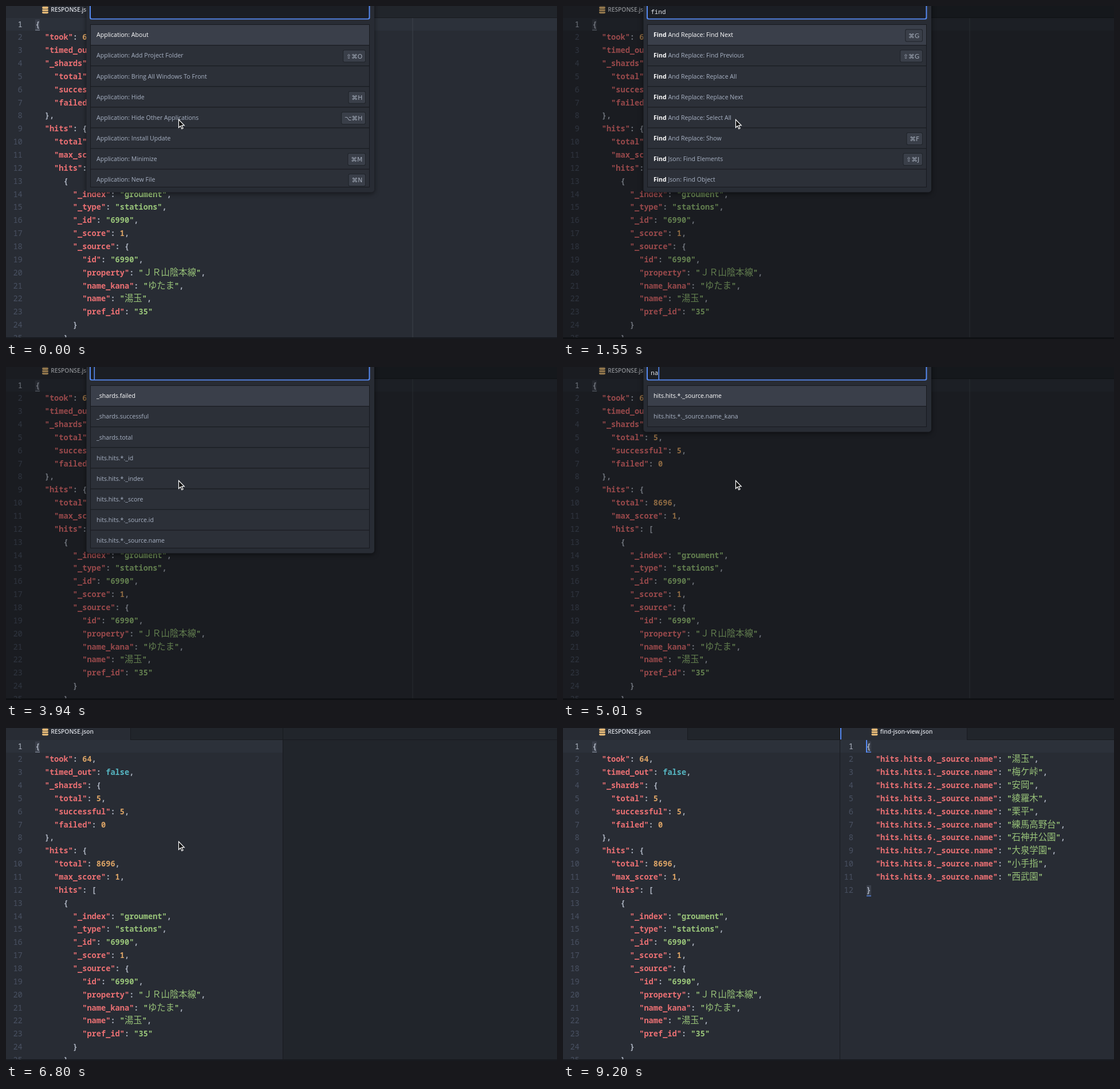
Animation, 962 px wide and 582 px high, one loop 9.5 s. Source, as an HTML page with a canvas:

```html
<!DOCTYPE html>
<html lang="en">
<head>
<meta charset="utf-8">
<title>Find JSON</title>
<style>
html, body { margin: 0; width: 100%; height: 100%; overflow: hidden; background: #282c34; }
canvas { display: block; }
</style>
</head>
<body>
<canvas id="stage" width="962" height="582"></canvas>
<script>
const ctx = document.getElementById('stage').getContext('2d');
const LOOP = 9500, W = 962, H = 582, ROW = 22.85, FOOT = 579;
const UI = '"Open Sans", "Noto Sans", sans-serif';
const MONO = '"Noto Sans Mono", "DejaVu Sans Mono", monospace';
const CJK = '"Noto Sans CJK JP", "Noto Sans CJK", sans-serif';
const C = {
  bg: '#282c34', bar: '#21252b', edge: '#181a1f', line: '#2c313a', blue: '#568af2',
  text: '#abb2bf', gutter: '#495162', key: '#ea7073', str: '#98c379', num: '#d9a265', lit: '#56b6c2'
};

const response = `{
  "took": 64,
  "timed_out": false,
  "_shards": {
    "total": 5,
    "successful": 5,
    "failed": 0
  },
  "hits": {
    "total": 8696,
    "max_score": 1,
    "hits": [
      {
        "_index": "groument",
        "_type": "stations",
        "_id": "6990",
        "_score": 1,
        "_source": {
          "id": "6990",
          "property": "ＪＲ山陰本線",
          "name_kana": "ゆたま",
          "name": "湯玉",
          "pref_id": "35"
        }
      },`.split('\n');

const stations = '湯玉 梅ケ峠 安岡 綾羅木 栗平 練馬高野台 石神井公園 大泉学園 小手指 西武園'.split(' ');
const found = ['{', ...stations.map((s, i) =>
  `  "hits.hits.${i}._source.name": "${s}"${i < 9 ? ',' : ''}`), '}'];

// A "|" separates a command from its key binding.
const lists = {
  app: ['About', 'Add Project Folder|⇧⌘O', 'Bring All Windows To Front', 'Hide|⌘H',
    'Hide Other Applications|⌥⌘H', 'Install Update', 'Minimize|⌘M', 'New File|⌘N'].map(s => 'Application: ' + s),
  find: ['Find And Replace: Find Next|⌘G', 'Find And Replace: Find Previous|⇧⌘G', 'Find And Replace: Replace All',
    'Find And Replace: Replace Next', 'Find And Replace: Select All', 'Find And Replace: Show|⌘F',
    'Find Json: Find Elements|⇧⌘J', 'Find Json: Find Object'],
  json: ['Find Json: Find Object', 'Find Json: Find Elements|⇧⌘J'],
  paths: ['_shards.failed', '_shards.successful', '_shards.total',
    ...['_id', '_index', '_score', '_source.id', '_source.name'].map(s => 'hits.hits.*.' + s)],
  names: ['hits.hits.*._source.name', 'hits.hits.*._source.name_kana']
};

// Palette states: start time, query, list, caret shown, selected row.
const states = [
  [0, '', 'app', 0], [480, '', 'app', 1], [630, 'f', 'find', 1], [780, 'fi', 'find', 1],
  [930, 'fin', 'find', 1], [1110, 'find', 'find', 1], [1550, 'find', 'find', 0],
  [1700, 'find ', 'find', 1], [2000, 'find j', 'find', 1], [2150, 'find js', 'json', 1],
  [2300, 'find jso', 'json', 1], [2450, 'find json', 'json', 0], [2600, 'find json', 'json', 1],
  [3050, 'find json', 'json', 0], [3200, 'find json', 'json', 0, 1], [3350, 'find json', 'json', 1, 1],
  [3790, '', ''], [3940, '', 'paths', 1], [4090, '', 'paths', 0], [4230, '', 'paths', 1],
  [4710, 'n', 'paths', 1], [4860, 'n', 'names', 1], [5010, 'na', 'names', 1], [5160, 'name', 'names', 1],
  [5760, 'name', 'names', 0], [6060, 'name', 'names', 1], [6510, 'name', 'names', 0], [6800, '', '']
];

function rect(x, y, w, h, color) {
  ctx.fillStyle = color;
  ctx.fillRect(x, y, w, h);
}

function text(s, x, y, font, color) {
  ctx.font = font;
  ctx.fillStyle = color;
  ctx.fillText(s, x, y);
  return x + ctx.measureText(s).width;
}

function round(x, y, w, h, r, color) {
  ctx.fillStyle = color;
  ctx.beginPath();
  ctx.roundRect(x, y, w, h, r);
  ctx.fill();
}

function codeLine(s, x, y) {
  const tokens = /("[^"]*")(?=:)|("[^"]*")|(\d+)|(false)|[^"\df]+/g;
  for (const [tok, key, str, num, lit] of s.matchAll(tokens)) {
    const color = key ? C.key : str ? C.str : num ? C.num : lit ? C.lit : C.text;
    for (const part of tok.match(/[\x00-\x7f]+|[^\x00-\x7f]+/g)) {
      const font = part.charCodeAt(0) > 127 ? '500 15.4px ' + CJK : '600 13.67px ' + MONO;
      x = text(part, x, y, font, color);
    }
  }
}

function brace(x, row, underline) {
  const y = 23.5 + row * ROW;
  rect(x, y, 8, 19, '#3a3f4a');
  rect(x, y + 18, 8, 1.3, underline);
}

function code(lines, x, w, accent) {
  rect(x, 21, w, 22, C.line);
  brace(x + 51 - (x ? 5 : 0), 0, accent);
  if (x) brace(x + 46, lines.length - 1, accent);
  const left = x ? 529.5 : 51.3;
  lines.forEach((s, i) => {
    const y = 36.5 + i * ROW;
    ctx.textAlign = 'right';
    text(i + 1, left - 22.5, y, '13.67px ' + MONO, i ? C.gutter : C.text);
    ctx.textAlign = 'left';
    codeLine(s, left, y);
  });
}

function tab(x, w, label) {
  rect(x, 0, w, 21, C.bg);
  rect(x + w, 0, 1, 21, C.edge);
  const ix = x ? 538.5 : 63;
  for (const y of [9.4, 5.2, 1]) {
    round(ix - .5, y - .8, 12, 5.4, [5, 5, 6, 6], C.bg);
    round(ix, y, 11, 3.9, [4, 4, 5, 5], '#e3b877');
  }
  text(label, ix + 15.3, 10, '600 10.2px ' + UI, '#d7dae0');
}

function editor(t) {
  const split = t >= 6800, w = split ? 483 : W;
  rect(0, 0, W, H, C.bg);
  rect(0, 0, W, 20, C.bar);
  rect(0, 20, W, 1, C.edge);
  ctx.save();
  ctx.beginPath();
  ctx.rect(0, 0, w, FOOT);
  ctx.clip();
  tab(0, 217, 'RESPONSE.json');
  code(response, 0, w, '#7d8492');
  ctx.restore();
  if (split) rightPane(t);
  else rect(709.5, 21, 1, FOOT - 21, '#3d424b');
  rect(0, FOOT, W, 3, C.edge);
}

function rightPane(t) {
  if (t < 6950) {
    rect(484, 21, W - 484, FOOT - 21, C.bar);
  } else {
    tab(484, 221, 'find-json-view.json');
    rect(484, 0, 2, 20, C.blue);
    code(t < 7120 ? [''] : found, 484, W - 484, C.blue);
    const off = [[7570, 8010], [8310, 8600], [8900, 9200]].some(([a, b]) => t >= a && t < b);
    if (t >= 7270 && !off) rect(529, 21, 2, 22, C.blue);
  }
  rect(483, 0, 1, FOOT, C.edge);
}

function badge(keys, y) {
  ctx.font = '10.8px "DejaVu Sans", sans-serif';
  const w = ctx.measureText(keys).width + 11.5, x = 628 - w;
  round(x, y - 11, w, 22, 3, '#1f2329');
  round(x + 1, y - 10, w - 2, 20, 2, '#3a3f49');
  text(keys, x + 5.75, y + 4, ctx.font, '#a3abb9');
}

function item(label, i, query, selected) {
  const [name, keys] = label.split('|'), top = 33 + i * 36.1, y = top + 17.6;
  rect(148, top, 486, 35.2, selected ? '#3a3f4a' : '#2c3038');
  rect(148, top + 35.2, 486, 1, C.edge);
  const n = name.toLowerCase().startsWith(query.trim()) ? query.trim().length : 0;
  const x = text(name.slice(0, n), 158, y + 3.7, 'bold 10.6px ' + UI, '#fff');
  text(name.slice(n), x, y + 3.7, (selected && !n ? '500' : '400') + ' 10.6px ' + UI, selected ? '#fff' : '#a8b2c4');
  if (keys) badge(keys, y + .9);
}

function palette([, query, list, caret, sel = 0]) {
  const rows = lists[list], bottom = rows.length > 2 ? 317 : 105;
  ctx.save();
  ctx.shadowColor = 'rgba(0,0,0,.55)';
  ctx.shadowBlur = 9;
  ctx.shadowOffsetY = 2;
  round(140.5, -20, 502.5, bottom + 28.5, 5, C.bg);
  ctx.restore();
  round(146, -10, 489.5, 33.5, 3, C.blue);
  round(148, -10, 485.5, 31.8, 2, '#1b1e24');
  text(query, 153.3, 13.6, '500 10.9px ' + MONO, '#e3e6ec');
  if (caret) rect(153.5 + query.length * 6.5, 0, 1.6, 22, C.blue);
  rect(147, 32, 488, bottom - 32, C.edge);
  ctx.save();
  ctx.beginPath();
  ctx.rect(147, 32, 488, bottom - 33);
  ctx.clip();
  rows.forEach((s, i) => item(s, i, query, i === sel));
  ctx.restore();
}

function pointer(t) {
  const p = t < 8010 ? 0 : Math.min(1, (Math.floor((t - 8010) / 150) + 1) / 8);
  const e = p * p * (3 - 2 * p);
  ctx.save();
  ctx.translate(301.5 + 635 * e, 198.5 + 390 * e);
  ctx.fillStyle = '#080808';
  ctx.strokeStyle = '#fff';
  ctx.lineWidth = 1.2;
  const arrow = new Path2D('M0 0V14L3.2 11L5.4 16.2L7.6 15.2L5.4 10.2H9.8Z');
  ctx.fill(arrow);
  ctx.stroke(arrow);
  ctx.restore();
}

function draw(now) {
  const t = now % LOOP;
  editor(t);
  if (t >= 150 && t < 6800) rect(0, 0, W, H, 'rgba(0,0,0,.36)');
  const state = states.findLast(s => s[0] <= t);
  if (state[2]) palette(state);
  pointer(t);
}

const start = performance.now();
function tick() {
  draw(performance.now() - start);
  requestAnimationFrame(tick);
}
tick();
</script>
</body>
</html>
```
